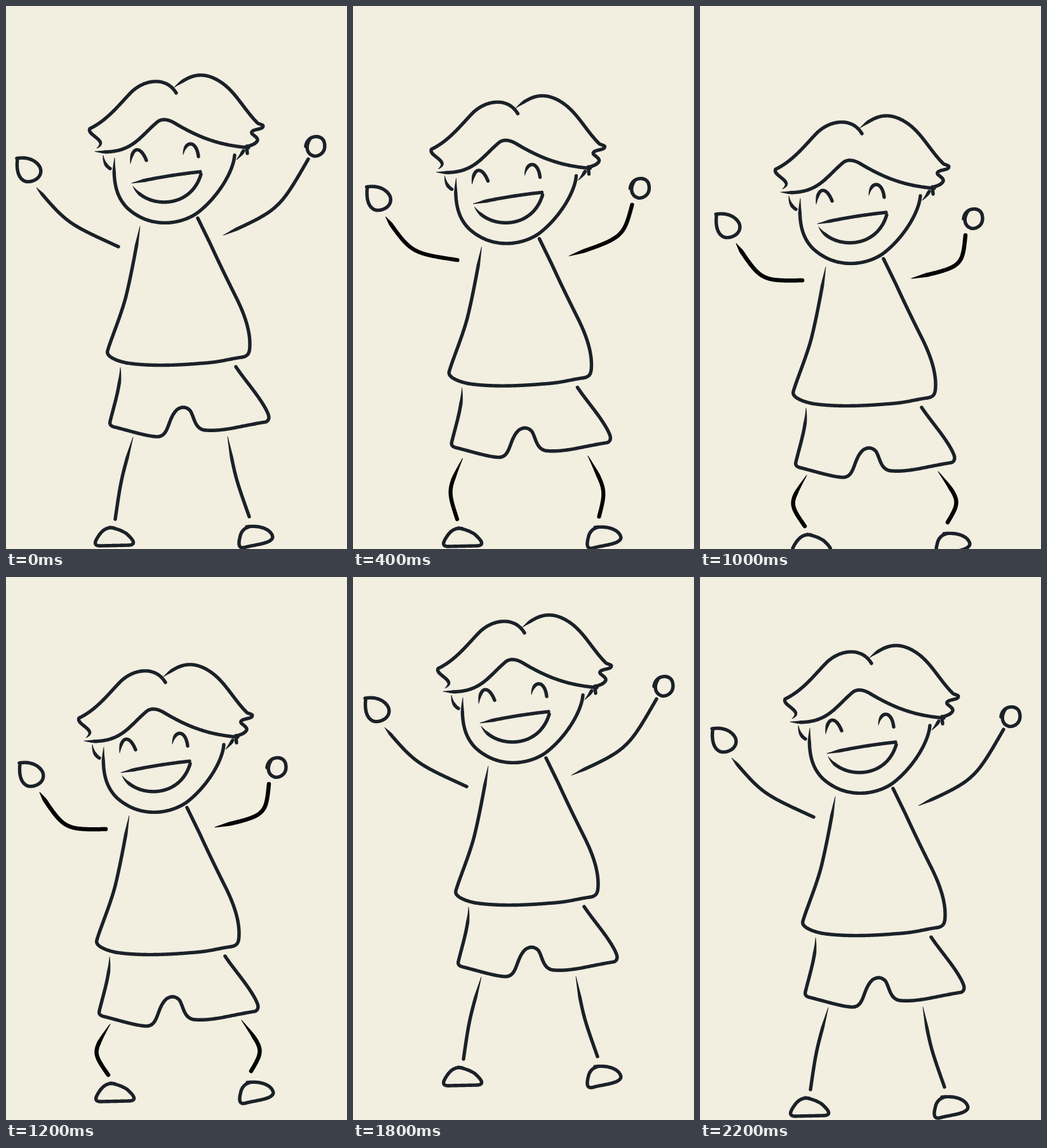
Write an HTML page with a canvas that moves like this. It is 537 by 855 pixels and loops after 2400 ms.

```html
<!DOCTYPE html>
<html lang="en">
<head>
<meta charset="utf-8">
<title>Jumping boy</title>
<style>
  html, body { margin: 0; width: 100%; height: 100%; overflow: hidden; background: #f2eee0; }
  canvas { display: block; }
</style>
</head>
<body>
<canvas id="stage" width="537" height="855"></canvas>
<script>
const ctx = document.getElementById('stage').getContext('2d');
const PAPER = '#f2eee0', INK = '#1b2128', BLACK = '#030404';
const STEP = 200, LINE = 5.4;

// Brush line: a path whose ends may thin out over the given lengths
const BODY = [
  // hair
  brush('M268,137 C252,110 217,116 197,136 C180,153 160,180 132,193 C128,201 147,207 149,216 Q149,220 143,224', 0, 12),
  brush('M265,128 C285,112 307,98 340,121 C362,136 377,166 397,185 Q407,188 405,190 C402,195 392,193 387,198 C384,202 398,206 396,212 Q393,218 380,221', 16),
  brush('M140,229 C198,235 210,206 239,182 Q249,175 265,184 C297,203 330,219 382,223', 16),
  brush('M379,221 L380,232'),
  brush('M374,228 Q370,235 363,242', 0, 14),
  // ear and face
  brush('M153,235 Q154,250 164,256', 16),
  brush('M171,239 C168,278 174,300 190,317 C224,350 272,346 301,326 C333,302 358,261 360,235', 22),
  // eyes and mouth
  brush('M196,248 C198,220 212,220 221,243', 14),
  brush('M279,234 C282,211 300,211 303,237', 14),
  brush('M198,279 Q250,267 306,261', 20),
  brush('M200,284 C220,318 290,322 307,265', 16),
  // shirt
  brush('M211,347 C205,380 198,420 189,457 C181,488 165,525 160,543 C157,552 175,559 190,562 C235,569 290,564 315,562 S350,556 372,553 C382,551 384,546 384,532 C384,505 371,476 362,458 S338,410 322,375 L302,334', 30),
  // shorts
  brush('M180,569 C181,595 172,622 164,654 Q162,661 171,663 C195,669 220,677 236,678 C258,680 253,650 270,635 Q281,628 290,637 C297,648 297,667 315,668 C343,670 370,661 409,655 Q416,652 413,643 C404,620 378,592 362,568', 24),
];
const HAND_L = [brush('M17,240 C32,237 48,242 54,255 C59,271 40,279 30,276 C16,270 17,250 18,241')];
const HAND_R = [brush('M472,221 C474,203 497,201 501,214 C506,232 490,238 484,236 C472,232 472,219 479,209')];
const FEET = [
  brush('M170,822 Q156,819 146,834 C140,843 137,850 148,850 L194,849 C206,848 200,840 190,831 Q180,824 164,821'),
  brush('M379,820 C402,817 418,825 420,836 C419,847 390,848 374,853 C364,854 367,842 369,834 Q372,823 383,820'),
];

// Key poses: offsets from standing, then limbs as end, joint, end
const POSES = [
  { // standing
    body: [0, 0], handL: [0, 0], handR: [0, 0], feet: [0, 0],
    armL: [48, 286, 96, 342, 177, 379], armR: [476, 241, 430, 321, 342, 361],
    legL: [200, 679, 181, 746, 172, 808], legR: [349, 678, 361, 742, 383, 804],
  },
  { // dipping
    body: [1, 13], handL: [6, 14], handR: [-9, 30], feet: [4, 3],
    armL: [51, 302, 92, 357, 173, 380], armR: [466, 277, 443, 331, 353, 370],
    legL: [182, 698, 163, 753, 168, 809], legR: [370, 696, 392, 756, 390, 807],
  },
  { // crouching
    body: [-18, 52], handL: [3, 76], handR: [-62, 102], feet: [0, -1],
    armL: [52, 362, 91, 421, 156, 420], armR: [413, 349, 408, 399, 328, 417],
    legL: [163, 727, 135, 771, 160, 807], legR: [370, 721, 405, 767, 385, 801],
  },
];

// One jump: [bend (0 standing, 2 crouching), shift x, shift y]
const JUMP = [
  [0, 0, 0], [1, 0, 0], [1.5, 0, 0], [2, 0, 0], [2, 4, 11], [2, 5, 12],
  [2, 1, -23], [1.5, 1, -101], [1, -3, -107], [0, 2, -49], [0, 2, -24], [0, 2, -1],
];

function poseAt(bend) {
  const i = Math.min(Math.floor(bend), POSES.length - 2), t = bend - i, pose = {};
  for (const part in POSES[i]) {
    pose[part] = POSES[i][part].map((v, k) => v + (POSES[i + 1][part][k] - v) * t);
  }
  return pose;
}

// Outline of a stroke with round ends and optional tapers
function brush(d, taperIn = 0, taperOut = 0, width = LINE) {
  const line = document.createElementNS('http://www.w3.org/2000/svg', 'path');
  line.setAttribute('d', d);
  const total = line.getTotalLength(), count = Math.ceil(total / 1.5);
  const thin = (s, taper) => taper ? Math.min(1, 0.15 + 0.85 * s / taper) : 1;
  const dots = Array.from({ length: count + 1 }, (_, i) => {
    const s = total * i / count, p = line.getPointAtLength(s);
    const a = line.getPointAtLength(Math.max(0, s - 0.5));
    const b = line.getPointAtLength(Math.min(total, s + 0.5));
    return {
      x: p.x, y: p.y, angle: Math.atan2(b.y - a.y, b.x - a.x),
      r: width / 2 * Math.min(thin(s, taperIn), thin(total - s, taperOut)),
    };
  });
  const shape = new Path2D();
  const edge = (p, side) => shape.lineTo(p.x - Math.sin(p.angle) * p.r * side, p.y + Math.cos(p.angle) * p.r * side);
  const cap = (p, angle) => shape.arc(p.x, p.y, p.r, angle + Math.PI / 2, angle - Math.PI / 2, true);
  dots.forEach(p => edge(p, 1));
  cap(dots[count], dots[count].angle);
  dots.slice().reverse().forEach(p => edge(p, -1));
  cap(dots[0], dots[0].angle + Math.PI);
  shape.closePath();
  return shape;
}

// The curve leans hard on the elbow or knee
function limb([ax, ay, jx, jy, bx, by], taperIn, taperOut, width) {
  return brush(`M${ax},${ay} C${jx},${jy} ${jx},${jy} ${bx},${by}`, taperIn, taperOut, width);
}

function draw(shapes, [x, y], color = INK) {
  ctx.save();
  ctx.translate(x, y);
  ctx.fillStyle = color;
  shapes.forEach(shape => ctx.fill(shape));
  ctx.restore();
}

function paint([bend, x, y]) {
  const pose = poseAt(bend), width = LINE + 0.55 * bend;
  ctx.fillStyle = PAPER;
  ctx.fillRect(0, 0, 537, 855);
  ctx.save();
  ctx.translate(x, y);
  draw(BODY, pose.body);
  draw(HAND_L, pose.handL);
  draw(HAND_R, pose.handR);
  draw(FEET, pose.feet);
  draw([limb(pose.armL, 14, 0, width)], [0, 0], bend > 1 ? BLACK : INK);
  draw([
    limb(pose.armR, 0, 24, width),
    limb(pose.legL, 34, 0, width),
    limb(pose.legR, 34, 0, width),
  ], [0, 0], bend > 0 ? BLACK : INK);
  ctx.restore();
}

let shown = -1;
function tick() {
  const step = Math.floor(performance.now() / STEP) % JUMP.length;
  if (step !== shown) paint(JUMP[shown = step]);
  requestAnimationFrame(tick);
}
tick();
</script>
</body>
</html>
```
